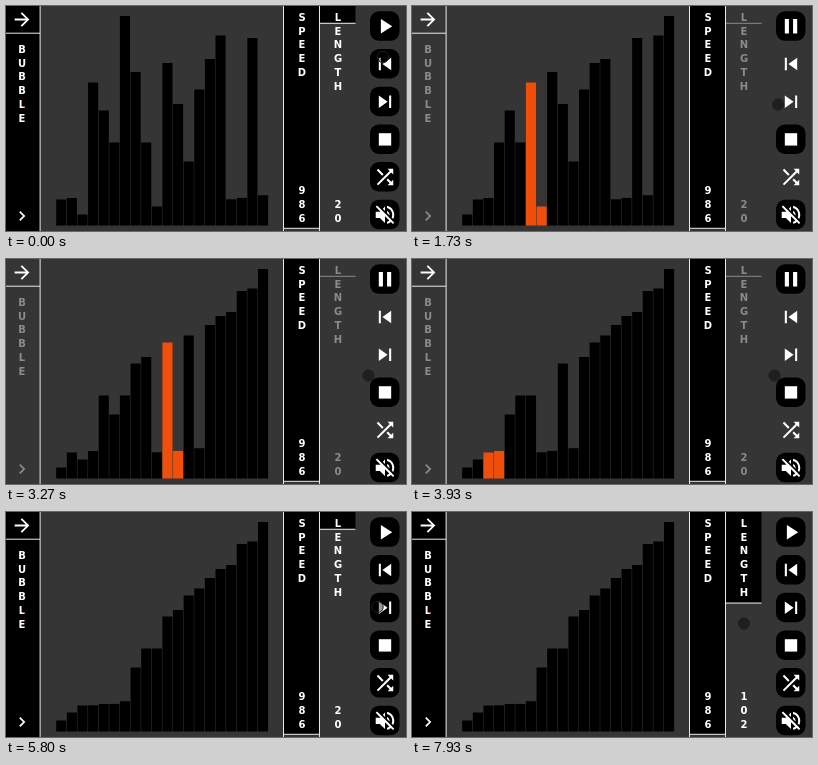
These frames come from a looping animation (400 by 225 pixels, 8000 ms). An HTML page:

```html
<!DOCTYPE html>
<html lang="en">
<head>
<meta charset="utf-8">
<title>Bubble sort</title>
<style>
  html, body { margin: 0; width: 100%; height: 100%; overflow: hidden; background: #363536; }
  svg { display: block; width: 100vw; height: 100vh; }
  text { font: 700 10px "DejaVu Sans", sans-serif; text-anchor: middle; }
</style>
</head>
<body>
<svg id="stage" viewBox="0 0 400 225"></svg>
<script>
const LOOP = 8000;
const SORT_START = 568, TICK = 15.79;
const DRAG_START = 6250, DRAG_END = 7450;
const BASE = 219.5, BAR_X = 50.2, BAR_STEP = 10.62;
const DIM = '#8b8b8b', LINE = '#e8e8e8', HOT = '#ef4f0a';

const ICONS = {
  play: 'M8 5v14l11-7z',
  pause: 'M6 19h4V5H6zM14 5v14h4V5z',
  prev: 'M6 6h2v12H6zM9.5 12l8.5 6V6z',
  next: 'M6 18l8.5-6L6 6zM16 6v12h2V6z',
  stop: 'M6 6h12v12H6z',
  shuffle: 'M10.6 9.2L5.4 4 4 5.4l5.2 5.2zM14.5 4l2 2L4 18.6 5.4 20 18 7.5l2 2V4zM14.8 13.4l-1.4 1.4 3.1 3.1L14.5 20H20v-5.5l-2 2z',
  mute: 'M16.5 12A4.5 4.5 0 0 0 14 8v2.2l2.45 2.45zM19 12c0 .94-.2 1.82-.54 2.64l1.5 1.5A9 9 0 0 0 14 3.2v2.1A7 7 0 0 1 19 12zM4.3 3L3 4.3 7.7 9H3v6h4l5 5v-6.7l4.2 4.2a7 7 0 0 1-2.2 1.2v2a9 9 0 0 0 3.7-1.8l2 2 1.3-1.3-9-9zM12 4L9.9 6.1 12 8.2z',
  arrow: 'M12 4l-1.41 1.41L16.17 11H4v2h12.17l-5.58 5.59L12 20l8-8z',
  chevron: 'M10 6L8.59 7.41 13.17 12l-4.58 4.59L10 18l6-6z'
};

const stage = document.getElementById('stage');

function set(node, attrs) {
  for (const k in attrs) node.setAttribute(k, attrs[k]);
  return node;
}
function add(tag, attrs, parent = stage) {
  return parent.appendChild(set(document.createElementNS('http://www.w3.org/2000/svg', tag), attrs));
}
function rect(x, y, width, height, fill = '#000', rx = 0) {
  return add('rect', { x, y, width, height, fill, rx });
}
function icon(name, x, y, scale = 1) {
  return add('path', {
    d: ICONS[name], fill: '#fff',
    transform: `translate(${x} ${y}) scale(${scale}) translate(-12 -12)`
  });
}
function column(word, x, y) {
  const g = add('g', { fill: '#fff' });
  [...word].forEach((ch, i) => {
    add('text', { x, y: y + i * 13.75 }, g).textContent = ch;
  });
  return g;
}

// One snapshot per tick: compare, swap and end of pass each take one.
function record(values) {
  const a = values.slice(), log = [];
  const snap = hot => log.push({ bars: a.slice(), hot });
  for (let end = a.length - 1; end > 0; end--) {
    for (let j = 0; j < end; j++) {
      snap(j);
      if (a[j] > a[j + 1]) {
        [a[j], a[j + 1]] = [a[j + 1], a[j]];
        snap(j);
      }
    }
    snap(-9);
  }
  snap(-9);
  return log;
}

const heights = [26, 27.5, 11, 143, 115, 83, 209.5, 153.5, 83, 19,
  162.5, 121.5, 64, 136, 166.5, 190, 26.2, 27.6, 187.5, 30.3];
const steps = record(heights);
const sortEnd = SORT_START + (steps.length - 1) * TICK;

// Left panel
const leftFill = rect(0, 0, 34, 225);
rect(0, 26.7, 34, 1, LINE);
rect(33.6, 0, 1, 225, LINE);
icon('arrow', 16, 13.5, 0.92);
const title = column('BUBBLE', 16, 46.9);
const speck = rect(17.5, 100, 1.5, 1.5, '#b03030');
const chevron = icon('chevron', 16, 210, 0.83);

// Bars
const bars = heights.map((h, i) => rect(BAR_X + i * BAR_STEP, 0, BAR_STEP - 0.5, h));

// Sliders
rect(278, 0, 36, 222);
rect(278, 221.8, 36, 1, LINE);
column('SPEED', 296, 14.9);
column('986', 296, 188.4);
const lengthFill = rect(314, 0, 35.5, 16);
const lengthLine = rect(314, 16, 35.5, 1, LINE);
rect(277, 0, 1, 225, LINE);
rect(313, 0, 1, 225, LINE);
const lengthLabel = column('LENGTH', 332, 14.9);
const lengthValue = column('   ', 332, 188.4);

// Buttons
const optional = [];
const [play] = ['play', 'prev', 'next', 'stop', 'shuffle', 'mute'].map((name, i) => {
  const y = 20.3 + i * 37.7;
  const back = rect(364, y - 15, 29.5, 29.5, '#000', 9);
  if (['prev', 'next', 'shuffle'].includes(name)) optional.push(back);
  return icon(name, 379, y, 1.03);
});

const pointer = add('circle', {
  r: 5.7, fill: '#000', 'fill-opacity': 0.4, stroke: '#202020', 'stroke-width': 1
});

const pointerPath = [
  [0, 377, 51], [70, 377, 51], [330, 383, 29], [1430, 383, 29],
  [1730, 366, 98.5], [2000, 362.5, 116.5], [5150, 362.5, 116.5], [5600, 371.5, 95],
  [5850, 371.5, 95], [6200, 332, 37], [DRAG_START, 332, 37.5], [DRAG_END, 332, 111.5], [LOOP, 332, 111.5]
];

function pointerAt(t) {
  const i = pointerPath.findIndex(p => p[0] > t);
  const [t0, x0, y0] = pointerPath[i - 1], [t1, x1, y1] = pointerPath[i];
  const k = (t - t0) / (t1 - t0);
  return { cx: x0 + (x1 - x0) * k, cy: y0 + (y1 - y0) * k };
}

function render(t) {
  const running = t >= SORT_START && t < sortEnd;
  const tick = Math.floor((t - SORT_START) / TICK);
  const step = t < SORT_START ? { bars: heights, hot: -9 } : steps[Math.min(tick, steps.length - 1)];

  step.bars.forEach((h, i) => set(bars[i], {
    y: BASE - h, height: h,
    fill: i === step.hot || i === step.hot + 1 ? HOT : '#000'
  }));

  const shown = running ? 'none' : 'inline';
  [leftFill, lengthFill, speck, ...optional].forEach(n => set(n, { display: shown }));
  [title, chevron, lengthLabel, lengthValue].forEach(n => set(n, { fill: running ? DIM : '#fff' }));
  set(lengthLine, { fill: running ? DIM : LINE });
  set(play, { d: running ? ICONS.pause : ICONS.play });

  const drag = Math.min(1, Math.max(0, (t - DRAG_START) / (DRAG_END - DRAG_START)));
  const length = Math.round(20 + 82 * drag);
  const y = 0.9 * length - 1.2;
  set(lengthFill, { height: y });
  set(lengthLine, { y });
  const digits = String(length).padStart(3);
  [...lengthValue.children].forEach((n, i) => { n.textContent = digits[i]; });

  set(pointer, pointerAt(t));
}

const begin = performance.now();
function loop() {
  render((performance.now() - begin) % LOOP);
  requestAnimationFrame(loop);
}
loop();
</script>
</body>
</html>
```
